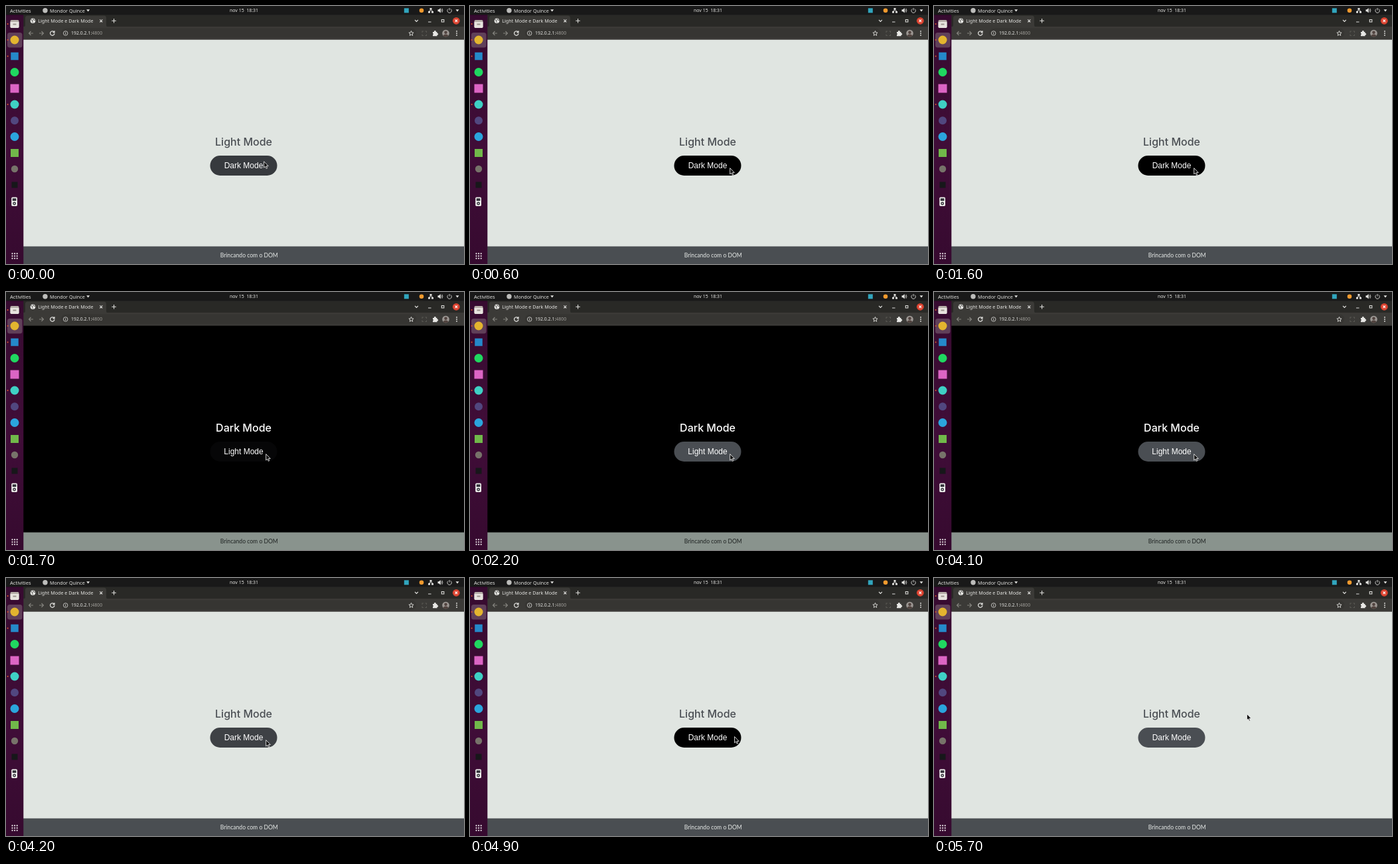
Animation, 690 px wide and 388 px high, one loop 6600 ms. Source, as an HTML page:

```html
<!DOCTYPE html>
<html lang="pt">
<head>
<meta charset="utf-8">
<title>Light Mode e Dark Mode</title>
<style>
  html, body { margin: 0; width: 100%; height: 100%; overflow: hidden; background: #000; }
  svg { display: block; width: 100vw; height: 100vh; }
  text { white-space: pre; }
  .ui { font-family: "Noto Sans", "Open Sans", sans-serif; font-size: 7.2px; fill: #e4e4e1; }
  .mid { text-anchor: middle; }
  #heading { font: 500 16px Inter, sans-serif; }
  #label { font: 12px "Liberation Sans", Arial, sans-serif; fill: #fff; }
  #credit { font: 8.6px Lato, sans-serif; }
  .line { fill: none; stroke: #dededb; stroke-width: 1.1; }
</style>
</head>
<body>
<svg viewBox="0 0 690 388" preserveAspectRatio="none">
  <defs>
    <linearGradient id="dockFill" x2="0" y2="1">
      <stop offset="0" stop-color="#370b30"/>
      <stop offset=".55" stop-color="#400d38"/>
      <stop offset="1" stop-color="#360a2f"/>
    </linearGradient>
    <clipPath id="face"><circle cx="662.5" cy="41" r="5.3"/></clipPath>
  </defs>

  <!-- page -->
  <rect id="page" x="26" y="50" width="664" height="312"/>
  <rect id="footer" x="26" y="361.5" width="664" height="26.5"/>
  <text id="heading" class="mid" x="358" y="210"></text>
  <rect id="button" x="307.5" y="225" width="101" height="30" rx="15"/>
  <text id="label" class="mid" x="358" y="244.2"></text>
  <text id="credit" class="mid" x="366.3" y="378">Brincando com o DOM</text>

  <!-- browser -->
  <rect x="26" y="13" width="664" height="19" fill="#292926"/>
  <path d="M26 31.5q3 0 3-3V18q0-3.5 3.5-3.5h115q3.500 0 3.500 3.500v10.500q0 3 3 3z" fill="#3b3a37"/>
  <rect x="26" y="31" width="664" height="19.700" fill="#3b3a37"/>
  <rect x="83" y="33.500" width="535" height="14.500" rx="7.250" fill="#363532"/>
  <circle cx="40.500" cy="22.300" r="3.800" fill="#e8e8e5"/>
  <path d="M37.500 20.500l2.500 1-.5 2 1.500 1.800M41 19l.5 1.700 2.300.8" class="line" style="stroke:#3b3a37;stroke-width:.9"/>
  <text class="ui" x="48.200" y="24.900">Light Mode e Dark Mode</text>
  <path class="line" d="M141.300 20.300l4 4m0-4l-4 4M159.300 22.300h6.600m-3.300-3.300v6.600"/>
  <path class="line" d="M616 21l2.400 2.400 2.400-2.400M636 24h4.500M656.300 20.500h3.500v3.500h-3.500z"/>
  <circle cx="678.300" cy="22.300" r="5.400" fill="#dc4330"/>
  <path class="line" d="M676.500 20.500l3.600 3.600m0-3.600l-3.600 3.600" style="stroke:#fff"/>
  <path class="line" d="M41 41h-6.500m3-3l-3 3 3 3M50 41h6.500m-3-3l3 3-3 3" style="stroke:#85847f"/>
  <path class="line" d="M72.300 39a3.200 3.200 0 1 0 .7 2.400M73 37.300v2.500h-2.500" style="stroke-width:1.300"/>
  <circle class="line" cx="89.700" cy="41" r="3.300" style="stroke-width:.8"/>
  <path class="line" d="M89.700 40.500v2.300M89.700 39v.8" style="stroke-width:.9"/>
  <text class="ui" x="98" y="43.400" style="font-size:6.950px">192.0.2.1:<tspan fill="#a09f9a">4800</tspan></text>
  <path class="line" d="M610.500 37.400l1 2.500 2.600.2-2 1.700.6 2.600-2.200-1.400-2.200 1.400.6-2.600-2-1.700 2.600-.2z" style="stroke-width:.9"/>
  <path class="line" d="M627 40v-2h2m2.500 0h2v2m0 2.500v2h-2m-2.500 0h-2v-2" style="stroke:#595853"/>
  <path d="M643 39h2a1.400 1.400 0 1 1 2.600 0h1.900v2a1.300 1.300 0 1 1 0 2.500v1.700H643v-2a1.200 1.200 0 0 0 0-2.300z" fill="#e8e8e5"/>
  <g clip-path="url(#face)">
    <rect x="657" y="35" width="12" height="12" fill="#9c9793"/>
    <circle cx="662.500" cy="39.700" r="2.300" fill="#51433f"/>
    <ellipse cx="662.500" cy="46" rx="4" ry="3.600" fill="#51433f"/>
  </g>
  <g fill="#e4e4e1"><circle cx="679" cy="38" r=".9"/><circle cx="679" cy="41" r=".9"/><circle cx="679" cy="44" r=".9"/></g>

  <!-- system bar -->
  <rect width="690" height="13.300" fill="#191919"/>
  <text class="ui" x="6" y="9.500" style="font-size:7.600px">Activities</text>
  <circle cx="59" cy="6.800" r="3.700" fill="#bdbdbb"/>
  <text class="ui" x="66" y="9.500">Mondor Quince</text>
  <path d="M121.200 5.300h5l-2.500 3.200zM677.500 5.300h5l-2.500 3.200z" fill="#e4e4e1"/>
  <text class="ui mid" x="358.500" y="9.400" style="font-size:6.950px">nov 15  18:31</text>
  <rect x="599.800" y="3.300" width="7" height="7" fill="#31a5bd"/>
  <circle cx="626" cy="6.700" r="3.300" fill="#f29a2e"/>
  <path d="M638.500 3h3v2.700h-3zM636 8h3v2.500h-3zM641 8h3v2.500h-3z" fill="#e4e4e1"/>
  <path class="line" d="M640 5v2m-2.500 1.500V7h5v1.500" style="stroke-width:.8"/>
  <path d="M650.500 5.300h1.700l2.500-2.300v7.500l-2.500-2.300h-1.700z" fill="#e4e4e1"/>
  <path class="line" d="M655.700 5q1.300 1.700 0 3.400M656.800 3.600q2.300 3.100 0 6.200" style="stroke-width:.8"/>
  <path class="line" d="M666.300 4.400a3.200 3.200 0 1 0 3.600 0M668.100 3v3.500" style="stroke-width:.9"/>

  <!-- dock -->
  <rect y="13.300" width="26.300" height="374.700" fill="url(#dockFill)"/>
  <rect x="2" y="40" width="22.500" height="22.500" rx="3.500" fill="#604059"/>
  <g id="dock"></g>
  <rect x="6.500" y="21" width="13" height="12" rx="1.800" fill="#b6aea8"/>
  <path d="M6.500 24h13v7.200q0 1.800-1.800 1.800h-9.400q-1.800 0-1.800-1.800z" fill="#e8e4df"/>
  <path d="M10.500 26.500h5v2h-5z" fill="#9c948e"/>
  <rect x="8.200" y="287.500" width="8.800" height="13.500" rx="1.700" fill="#ededeb"/>
  <rect x="9.800" y="289.300" width="5.600" height="3.700" fill="#33323a"/>
  <circle cx="12.600" cy="297" r="2.400" fill="#33323a"/>
  <circle cx="12.600" cy="297" r=".9" fill="#ededeb"/>

  <path id="cursor" d="M0 0v9.300l2.100-1.900 1.500 3.300 1.500-.7-1.500-3.100h3z" fill="#0a0a0a" stroke="#fff" stroke-width=".8" stroke-linejoin="round"/>
</svg>
<script>
const LOOP = 6600, STEP = 100, FADE = 300;
const TO_DARK = 1673, TO_LIGHT = 4158;
const $ = id => document.getElementById(id);
const grey = [74, 78, 83], black = [0, 0, 0];

const themes = {
  light: { page: '#e0e5e1', footer: '#4a4e52', ink: '#4a4e53', credit: '#e6e9e7', title: 'Light Mode', label: 'Dark Mode' },
  dark: { page: '#000', footer: '#89938d', ink: '#fff', credit: '#202423', title: 'Dark Mode', label: 'Light Mode' }
};

// start time, colour before, colour after
const fades = [
  [-54, grey, black],
  [TO_DARK, black, grey],
  [TO_LIGHT, grey, black],
  [5060, black, grey]
];

// time, x, y
const path = [
  [0, 388.6, 233.8], [100, 390.4, 239], [200, 391.3, 242.6], [300, 391.7, 243.7],
  [4700, 391.7, 243.7], [5000, 402, 236], [5200, 425, 219], [5400, 449.6, 208],
  [5500, 460, 205.5], [5600, 468, 204.6], [5700, 471.4, 204.5], [LOOP, 471.4, 204.5]
];

const lerp = (a, b, k) => a + (b - a) * k;

// CSS "ease": cubic-bezier(.25, .1, .25, 1)
function ease(x) {
  if (x <= 0 || x >= 1) return x <= 0 ? 0 : 1;
  const curve = (a, b, s) => 3 * a * s * (1 - s) ** 2 + 3 * b * s * s * (1 - s) + s ** 3;
  let lo = 0, hi = 1;
  for (let i = 0; i < 20; i++) {
    const s = (lo + hi) / 2;
    if (curve(.25, .25, s) < x) lo = s; else hi = s;
  }
  return curve(.1, 1, lo);
}

function buttonColour(t) {
  const [start, from, to] = fades.filter(f => f[0] <= t).pop();
  const k = ease((t - start) / FADE);
  return `rgb(${from.map((c, i) => Math.round(lerp(c, to[i], k)))})`;
}

function cursorAt(t) {
  const i = path.findIndex(p => p[0] > t);
  const a = path[i - 1], b = path[i];
  const k = (t - a[0]) / (b[0] - a[0]);
  return [lerp(a[1], b[1], k), lerp(a[2], b[2], k)];
}

function shape(tag, attrs) {
  const el = document.createElementNS('http://www.w3.org/2000/svg', tag);
  for (const key in attrs) el.setAttribute(key, attrs[key]);
  $('dock').append(el);
}

function buildDock() {
  const disc = (cx, cy, r, fill) => shape('circle', { cx, cy, r, fill });
  const tile = (y, s, fill) => shape('rect', { x: 13 - s / 2, y: y - s / 2, width: s, height: s, fill });
  disc(13, 51, 6.5, '#e3b52f');
  tile(75.5, 11.5, '#2589ca');
  disc(13, 99.5, 6.5, '#20d760');
  tile(124, 13, '#dc65c4');
  disc(13, 148, 6.5, '#3fd0c4');
  disc(13, 172.3, 6, '#51477f');
  disc(13, 196.5, 6.5, '#2ba5dd');
  tile(221, 12, '#71b84a');
  disc(13, 245, 5.2, '#77736a');
  tile(269, 9, '#17171a');
  for (const y of [27, 51, 75.5, 148]) disc(2.6, y, 1, '#e45a2b');
  for (let i = 0; i < 9; i++) disc(9.5 + i % 3 * 3.6, 372.4 + Math.floor(i / 3) * 3.6, 1.1, '#eee9ec');
}

function draw(t) {
  const theme = t >= TO_DARK && t < TO_LIGHT ? themes.dark : themes.light;
  $('page').setAttribute('fill', theme.page);
  $('footer').setAttribute('fill', theme.footer);
  $('heading').setAttribute('fill', theme.ink);
  $('heading').textContent = theme.title;
  $('label').textContent = theme.label;
  $('credit').setAttribute('fill', theme.credit);
  $('button').setAttribute('fill', buttonColour(t));
  $('cursor').setAttribute('transform', `translate(${cursorAt(t)})`);
}

const origin = performance.now();
function tick() {
  const t = (performance.now() - origin) % LOOP;
  draw(Math.floor(t / STEP) * STEP);
  requestAnimationFrame(tick);
}

buildDock();
tick();
</script>
</body>
</html>
```
